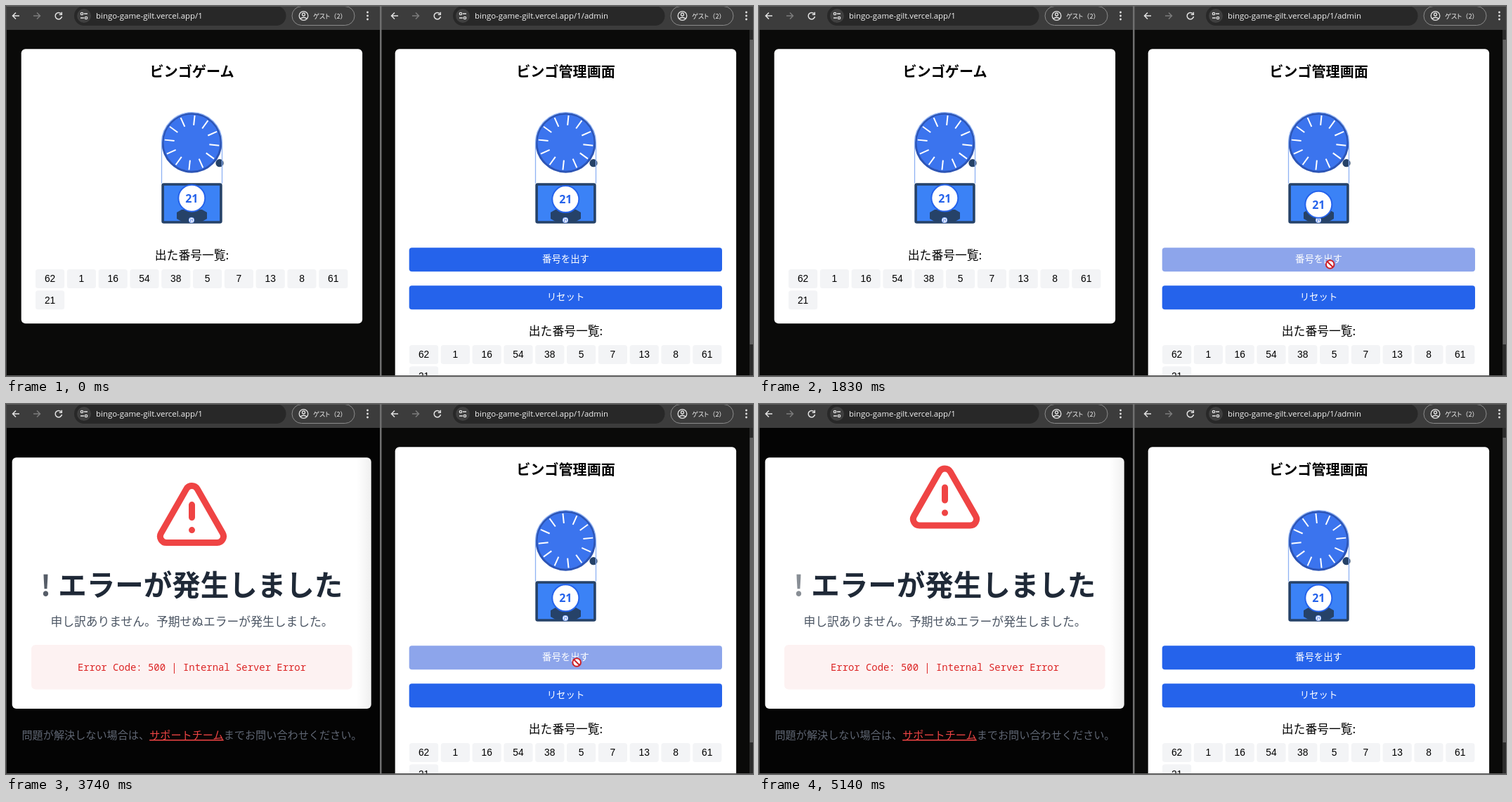
Recreate the animation shown at these times as an HTML page. Size 1063x527 px, loop 5210 ms.

```html
<!DOCTYPE html>
<html lang="ja">
<head>
<meta charset="utf-8">
<style>
html, body { margin: 0; width: 100%; height: 100%; overflow: hidden; background: #0a0a09; }
svg { display: block; width: 1063px; height: 527px; font-family: "Noto Sans CJK JP", "Noto Sans CJK", sans-serif; }
.mid { text-anchor: middle; }
.bar { font-family: "Open Sans", "Noto Sans", sans-serif; font-size: 11.45px; fill: #f1f1f1; }
.guest { font-size: 9.2px; fill: #eee; }
.guest tspan { font-feature-settings: "palt"; }
.title { font-size: 20.1px; font-weight: 700; }
.list { font-size: 16.8px; }
.chip { font: 13.8px "Liberation Sans", Arial, sans-serif; }
.ball { font: 700 16px "Noto Sans", "Open Sans", sans-serif; fill: #2563eb; }
.button { font-size: 13.4px; fill: #fff; }
</style>
</head>
<body>
<svg id="stage" viewBox="0 0 1063 527"></svg>
<script>
const LOOP = 5210;
const BOUNCE = 1042;          // one bounce, ms
const ERROR_AT = 2215, ERROR_CLOCK = 2174;
const HOVER_AT = 600, CLICK_AT = 1300, DISABLE_AT = 1430, LEAVE_AT = 4200, ENABLE_AT = 4800;
const NUMBERS = [62, 1, 16, 54, 38, 5, 7, 13, 8, 61, 21];

const rect = (x, y, w, h, fill, rx = 0, extra = "") =>
  `<rect x="${x}" y="${y}" width="${w}" height="${h}" rx="${rx}" fill="${fill}" ${extra}/>`;
const text = (x, y, cls, content, extra = "") =>
  `<text x="${x}" y="${y}" class="${cls}" ${extra}>${content}</text>`;

function toolbar(x, width, url) {
  return `<g transform="translate(${x})">
    ${rect(x ? -5 : 0, 0, width, 34, "#3c3c3c")}
    <g fill="none" stroke="#e3e3e3" stroke-width="1.5">
      <path d="M19 14H9.5M14 9.5L9.5 14L14 18.5"/>
      <path d="M39 14H48.5M44 9.5L48.5 14L44 18.5" stroke="#7c7c7c"/>
      <path d="M78.2 10.8A4.7 4.7 0 1 0 79.5 15M79.3 8.8V12.2H75.8"/>
    </g>
    ${rect(97, 0, 301.5, 28, "#282828", 14)}
    <circle cx="111" cy="14" r="10" fill="#3f3f3f"/>
    <g fill="none" stroke="#e3e3e3" stroke-width="1.3">
      <circle cx="108" cy="11" r="1.7"/><path d="M111 11H116M106 17H111"/><circle cx="114" cy="17" r="1.7"/>
    </g>
    ${text(128, 18, "bar", url)}
    ${rect(407, 0.5, 89, 27, "none", 13.5, 'stroke="#8b8b8b"')}
    <g fill="none" stroke="#e3e3e3" stroke-width="1.3">
      <circle cx="423.5" cy="14" r="6.3"/><circle cx="423.5" cy="12" r="2"/><path d="M419 18Q423.5 14.5 428 18"/>
    </g>
    ${text(437, 17.6, "guest", "<tspan>ゲスト</tspan>（2）")}
    ${[9, 14, 19].map(y => `<circle cx="514.5" cy="${y}" r="1.4" fill="#e3e3e3"/>`).join("")}
  </g>`;
}

function machine(side) {
  const ticks = Array.from({ length: 12 }, (_, i) =>
    `<path d="M0 -25V-39" transform="rotate(${6 + 30 * i})"/>`).join("");
  return `<g transform="translate(264.5 194.7)">
      <circle r="41.5" fill="#3b74ee" stroke="#2d55b5" stroke-width="3"/>
      <g id="${side}Wheel" stroke="#fff" stroke-width="2">${ticks}</g>
      <circle cx="39.5" cy="29" r="5.6" fill="#264268"/>
      <path d="M-43 58V0A43 43 0 0 1 43 0V58" fill="none" stroke="#8fb2f3" stroke-width="1.3"/>
    </g>
    ${rect(223.1, 254, 82.8, 54, "#3b82f6", 1.5, 'stroke="#264268" stroke-width="3.6"')}
    <path d="M243 294L250 290H279L286 294V303L279 307H250L243 303Z" fill="#264268"/>
    <circle cx="264" cy="305" r="4" fill="#fff" stroke="#2563eb" stroke-width=".6"/>
    ${text(264, 306.7, "ball mid", "21", 'style="font-size:4.5px"')}
    <g id="${side}Ball">
      <circle cx="264.3" cy="273.3" r="19" fill="#fff" stroke="#2563eb" stroke-width="2"/>
      ${text(264.3, 279.2, "ball mid", "21")}
    </g>`;
}

function history(y) {
  return text(264.5, y, "list mid", "出た番号一覧:") + NUMBERS.map((n, i) => {
    const x = 42 + 44.8 * (i % 10), top = y + 14 + 30.3 * Math.floor(i / 10);
    return rect(x, top, 41.2, 27, "#f3f4f6", 3.5) + text(x + 20.6, top + 18.2, "chip mid", n);
  }).join("");
}

const button = (id, y, label) => `<g id="${id}">
  ${rect(41.7, y, 445.3, 34, "#2563eb", 4)}${text(264.5, y + 20.9, "button mid", label)}</g>`;

const errorPage = `<g id="error">
  ${rect(0, 34, 532, 493, "#040404")}
  <linearGradient id="shade">
    <stop offset=".96" stop-color="#fff"/><stop offset="1" stop-color="#f0f0f0"/>
  </linearGradient>
  ${rect(8.7, 76.3, 511, 357.7, "url(#shade)", 6)}
  <g id="warning" fill="none" stroke="#ef4444" stroke-width="2" stroke-linecap="round" stroke-linejoin="round">
    <path d="M21.73 18l-8-14a2 2 0 0 0-3.48 0l-8 14A2 2 0 0 0 4 21h16a2 2 0 0 0 1.73-3M12 9v4M12 17h.01"/>
  </g>
  <g fill="#1f2937" font-size="40.5" font-weight="700" class="mid">
    <text id="mark" x="56.5" y="273">!</text><text x="276.7" y="273">エラーが発生しました</text>
  </g>
  ${text(264.5, 316, "list mid", "申し訳ありません。予期せぬエラーが発生しました。", 'fill="#4b5563"')}
  ${rect(36, 343, 456.5, 63.5, "#fdf2f2", 6)}
  <text x="264.5" y="380" class="mid" fill="#dc2626" style="font:13.9px 'Noto Sans Mono','DejaVu Sans Mono',monospace">Error Code: 500 | Internal Server Error</text>
  <text x="264.5" y="477" class="mid" fill="#5f6673" font-size="15.15">問題が解決しない場合は、<tspan fill="#ef4444" text-decoration="underline">サポートチーム</tspan>までお問い合わせください。</text>
</g>`;

const cursor = `<g id="cursor">
  <circle id="highlight" cy="1" r="10" fill="#dfdc45" opacity=".65"/>
  <g fill="#fff" stroke="#222" stroke-linejoin="round">
    <path id="arrow" d="M0 0V14L3.3 11L5.6 16L8 15L5.8 10.2H10Z"/>
    <path id="hand" d="M-1.5 -1Q0 -3 1.5 -1V5L6 6Q8 6.5 7.5 9L6.5 16H-1L-5 9Q-5.5 6.5 -1.5 9Z"/>
  </g>
  <g id="blocked" fill="#fff" stroke="#cc1f26" stroke-width="2">
    <circle r="5.8"/><path d="M-4 -4L4 4"/>
  </g>
</g>`;

document.getElementById("stage").innerHTML = `
  ${rect(0, 0, 1063, 527, "#0a0a09")}
  ${rect(21.7, 61.3, 485.4, 391, "#fff", 6)}
  ${text(264.5, 101, "title mid", "ビンゴゲーム")}
  ${machine("left")}${history(361)}
  ${errorPage}
  <g transform="translate(532)">
    ${rect(21.7, 61.3, 485.4, 500, "#fff", 6)}
    ${text(264.5, 101, "title mid", "ビンゴ管理画面")}
    ${machine("right")}
    ${button("draw", 344.3, "番号を出す")}${button("reset", 398.3, "リセット")}
    ${history(469)}
  </g>
  ${rect(1058, 34, 5, 493, "#2c2c2c")}${rect(1058.5, 48, 4.5, 434, "#646464")}
  ${toolbar(0, 532, "bingo-game-gilt.vercel.app/1")}
  ${toolbar(539, 529, "bingo-game-gilt.vercel.app/1/admin")}
  ${rect(0, 0, 1063, 1, "#5c5c5c")}${rect(0, 526, 1063, 1, "#5c5c5c")}
  ${rect(0, 0, 1, 527, "#4a4a4a")}${rect(532, 0, 2.5, 527, "#6f6f6f")}
  ${cursor}`;

const part = Object.fromEntries([...document.querySelectorAll("#stage [id]")].map(e => [e.id, e]));
const drawFace = part.draw.querySelector("rect");
const show = (element, on) => element.setAttribute("display", on ? "inline" : "none");
const move = (element, value) => element.setAttribute("transform", value);
const fraction = x => x - Math.floor(x);

function bezier(x1, y1, x2, y2) {
  const at = (a, b, s) => 3 * (1 - s) ** 2 * s * a + 3 * (1 - s) * s * s * b + s ** 3;
  return x => {
    let low = 0, high = 1;
    for (let i = 0; i < 22; i++) {
      const s = (low + high) / 2;
      if (at(x1, x2, s) < x) low = s; else high = s;
    }
    return at(y1, y2, low);
  };
}
const fall = bezier(0.8, 0, 1, 1);
const soft = bezier(0.4, 0, 0.6, 1);
// 0 at the ends of a cycle, 1 in its middle
const swing = (phase, ease) => ease(1 - Math.abs(2 * fraction(phase) - 1));

const PATH = [[200, 957, 460], [400, 890, 432], [530, 826, 383], [650, 813, 368],
  [LEAVE_AT, 812, 368], [4400, 1045, 535]];
function cursorAt(t) {
  const i = PATH.findIndex(p => p[0] > t);
  if (i < 1) return null;
  const [t0, x0, y0] = PATH[i - 1], [t1, x1, y1] = PATH[i], k = (t - t0) / (t1 - t0);
  return [x0 + (x1 - x0) * k, y0 + (y1 - y0) * k];
}

function render(t) {
  const failed = t >= ERROR_AT;
  const over = t >= HOVER_AT && t < LEAVE_AT + 20;
  const disabled = t >= DISABLE_AT && t < ENABLE_AT;

  move(part.leftBall, `translate(0 ${10 * swing(t / BOUNCE + 0.125, fall)})`);
  move(part.rightBall, `translate(0 ${10 * swing(t / BOUNCE + 0.735, fall)})`);
  move(part.rightWheel, `rotate(${failed ? -12 : 0})`);

  show(part.error, failed);
  const age = (t - ERROR_CLOCK) / BOUNCE;
  move(part.warning, `translate(210.5 ${77 + 27 * swing(age, fall)}) scale(4.5)`);
  part.mark.setAttribute("opacity", 1 - 0.5 * swing(age / 2, soft));

  drawFace.setAttribute("fill", over ? "#1d4ed8" : "#2563eb");
  part.draw.setAttribute("opacity", disabled ? 0.5 : 1);

  const spot = cursorAt(t);
  show(part.cursor, spot);
  if (spot) move(part.cursor, `translate(${spot})`);
  show(part.arrow, !over);
  show(part.hand, over && !disabled);
  show(part.blocked, over && disabled);
  show(part.highlight, t >= CLICK_AT && t < DISABLE_AT);
}

const start = performance.now();
function tick() {
  render((performance.now() - start) % LOOP);
  requestAnimationFrame(tick);
}
tick();
</script>
</body>
</html>
```
